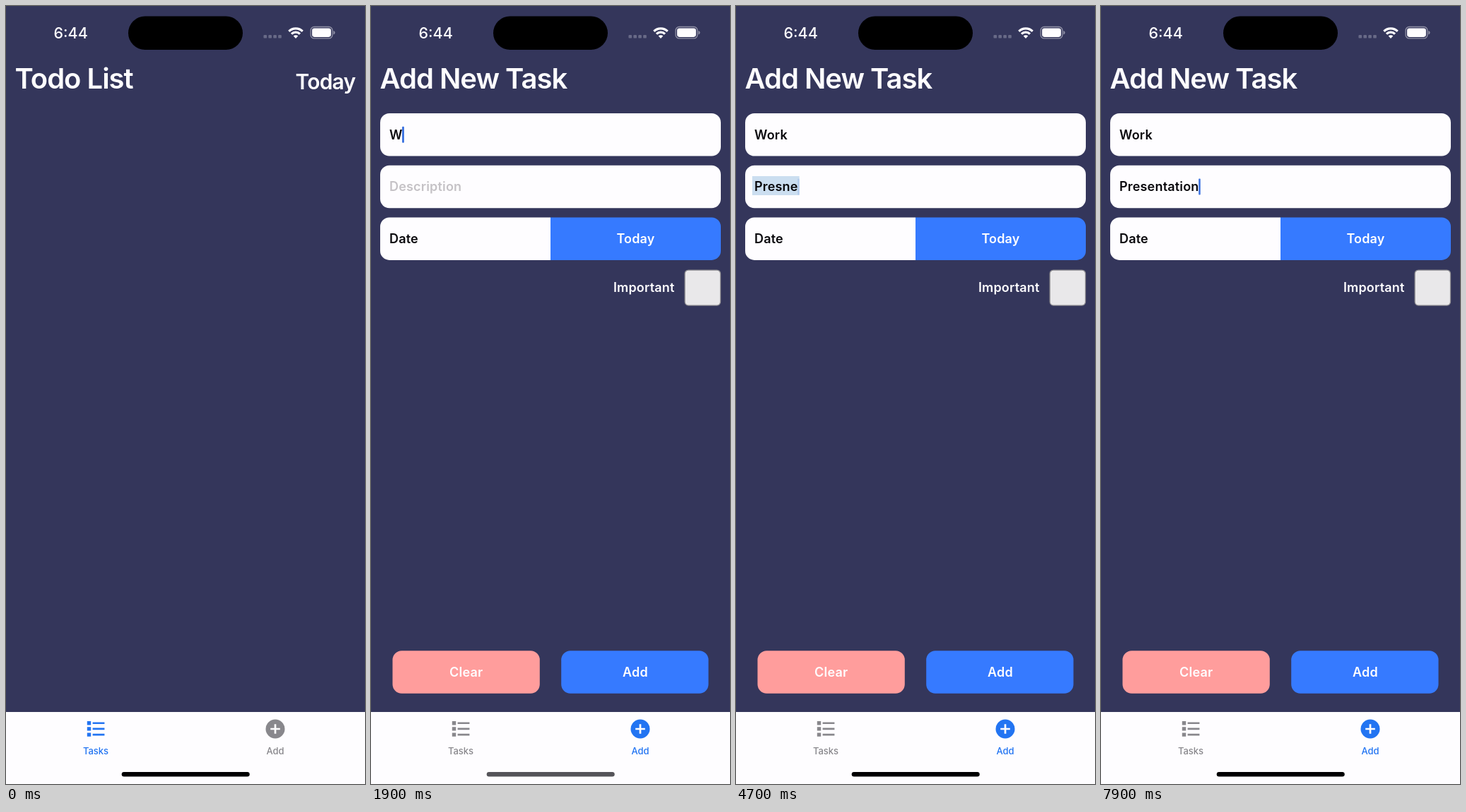
An HTML page that plays this animation: 508x1102 px, repeating every 8 s.

```html
<!DOCTYPE html>
<html lang="en">
<head>
<meta charset="utf-8">
<title>Todo List</title>
<style>
  html, body { margin: 0; width: 100%; height: 100%; overflow: hidden; background: #34365b; }
  svg { display: block; width: 508px; height: 1102px; }
  text { font-family: Inter, "Open Sans", sans-serif; font-optical-sizing: none; white-space: pre; }
  .clock { font-size: 21.5px; font-weight: 500; fill: #fefdff; }
  .title { font-size: 40px; font-weight: 600; letter-spacing: -.025em; fill: #fefdff; }
  .day { font-size: 30px; font-weight: 600; letter-spacing: -.025em; fill: #fefdff; }
  .body { font-size: 18px; font-weight: 600; letter-spacing: .01em; fill: #09080c; }
  .light { fill: #fefdff; }
  .hint { fill: #c5c2c6; }
  .guess { fill: #929195; }
  .mid { text-anchor: middle; }
  .tab { font-size: 13px; font-weight: 500; text-anchor: middle; }
  .white { fill: #fefdff; }
  .blue { fill: #367aff; }
  .off { fill: #88878c; }
  .on { fill: #2274f2; }
</style>
</head>
<body>
<svg viewBox="0 0 508 1102">
  <rect width="508" height="1102" fill="#34365b"/>

  <text class="clock" x="67.5" y="46">6:44</text>
  <rect x="173" y="14.5" width="162" height="47.5" rx="23.75"/>
  <g fill="#686a87">
    <rect x="364.5" y="41" width="4.6" height="4.6" rx="1.2"/>
    <rect x="371.4" y="41" width="4.6" height="4.6" rx="1.2"/>
    <rect x="378.3" y="41" width="4.6" height="4.6" rx="1.2"/>
    <rect x="385.2" y="41" width="4.6" height="4.6" rx="1.2"/>
  </g>
  <g fill="none" stroke="#fefdff" stroke-width="3.2">
    <path d="M400.3 35.8a13.8 13.8 0 0 1 19.4 0"/>
    <path d="M404 39.7a8.5 8.5 0 0 1 12 0"/>
  </g>
  <path class="white" d="M410 46l-3.3-3.4a4.7 4.7 0 0 1 6.6 0z"/>
  <rect x="431.1" y="29.5" width="30.8" height="16.4" rx="5" fill="none" stroke="#9091a6" stroke-width="1.3"/>
  <rect class="white" x="433.1" y="31.5" width="26.8" height="12.4" rx="3.3"/>
  <path d="M463.4 35v5.6q2.2-.7 2.2-2.8t-2.2-2.8z" fill="#9091a6"/>

  <g id="list">
    <text class="title" x="12.5" y="116.5">Todo List</text>
    <text class="day" x="494.5" y="118" text-anchor="end">Today</text>
  </g>

  <g id="form">
    <text class="title" x="12.5" y="116.5">Add New Task</text>
    <g class="white">
      <rect x="13" y="152" width="482" height="60.5" rx="13"/>
      <rect x="13" y="225.7" width="482" height="60.5" rx="13"/>
      <path d="M254 299.4H26a13 13 0 0 0-13 13v34.5a13 13 0 0 0 13 13h228z"/>
    </g>
    <path class="blue" d="M254 299.4h228a13 13 0 0 1 13 13v34.5a13 13 0 0 1-13 13H254z"/>
    <rect id="mark" x="23" y="241" height="27" fill="#cbdef0"/>
    <text class="body" x="26" y="188.6"><tspan id="name"></tspan></text>
    <text class="body" x="26" y="262.3"><tspan id="note"></tspan><tspan id="rest" class="guess"></tspan></text>
    <rect id="caret" width="2.6" height="23" rx="1" fill="#2b66de"/>
    <text class="body" x="26" y="336">Date</text>
    <text class="body light mid" x="374.5" y="336">Today</text>
    <text class="body light" x="429.5" y="405" text-anchor="end">Important</text>
    <rect x="444.1" y="374.1" width="50.4" height="50" rx="5" fill="#e9e8ea" stroke="#8c8b8f" stroke-width="1.3"/>
    <rect x="30.5" y="913.2" width="208.3" height="60.6" rx="13" fill="#ff9d9c"/>
    <text class="body light mid" x="134.7" y="950">Clear</text>
    <rect id="submit" x="269.2" y="913.2" width="208.3" height="60.6" rx="13"/>
    <text class="body light mid" x="373.9" y="950">Add</text>
  </g>

  <rect class="white" y="1000" width="508" height="102"/>
  <g id="tasksTab">
    <path d="M114.8 1013h5.4v5.4h-5.4zm0 8.2h5.4v5.4h-5.4zm0 8.2h5.4v5.4h-5.4zM122.6 1014.4h16.8v2.7h-16.8zm0 8.2h16.8v2.7h-16.8zm0 8.2h16.8v2.7h-16.8z"/>
    <text class="tab" x="127" y="1060">Tasks</text>
  </g>
  <g id="addTab">
    <circle cx="381" cy="1024" r="13.5"/>
    <path d="M374.2 1024h13.6M381 1017.2v13.6" stroke="#fefdff" stroke-width="2.7"/>
    <text class="tab" x="381" y="1060">Add</text>
  </g>
  <rect id="home" x="163.7" y="1085" width="181" height="6.5" rx="3.25"/>
</svg>

<script>
  const LOOP = 8000;
  const OPEN = 500, FOCUS = 1500, NEXT_FIELD = 3300, WAKE = 4300;
  const $ = id => document.getElementById(id);

  // Each track lists [start time, value].
  const nameTrack = [[0, ''], [1900, 'W'], [2100, 'Wor'], [2300, 'Work']];
  const noteTrack = [
    [0, ''], [3500, 'P'], [3700, 'Pre'], [3900, 'Pres'], [4100, 'Presn'], [4300, 'Presne'],
    [4900, 'Presn'], [5100, 'Pres'], [5300, 'Prese'], [5500, 'Presen'],
    [6300, 'Present'], [6500, 'Presenta'], [6700, 'Presentati'], [6900, 'Presentation']
  ];
  const caretTrack = [
    [0, 0], [1300, 1], [2900, 0], [3300, 1], [4700, .15], [4900, 1],
    [7500, .5], [7700, 0], [7900, .9]
  ];
  const word = 'Presentation';

  const at = (track, t) => track.filter(([start]) => start <= t).pop()[1];
  const show = (el, on) => el.setAttribute('visibility', on ? 'visible' : 'hidden');

  function fill(id, text, hint) {
    const el = $(id);
    const value = text || hint;
    if (el.textContent !== value) el.textContent = value;
    el.setAttribute('class', text ? '' : 'hint');
    return text ? el.getComputedTextLength() : 0;
  }

  function draw(t) {
    const form = t >= OPEN;
    show($('list'), !form);
    show($('form'), form);
    $('tasksTab').setAttribute('class', form ? 'off' : 'on');
    $('addTab').setAttribute('class', form ? 'on' : 'off');
    $('home').setAttribute('fill', t >= FOCUS && t < WAKE ? '#555459' : '#000');

    const name = at(nameTrack, t), note = at(noteTrack, t);
    const nameWidth = fill('name', name, 'Title');
    const noteWidth = fill('note', note, 'Description');
    const guess = t >= 5900 && t < 6900 ? word.slice(note.length) : '';
    if ($('rest').textContent !== guess) $('rest').textContent = guess;
    $('submit').setAttribute('fill', name ? '#367aff' : '#cac8cb');

    const second = t >= NEXT_FIELD;
    $('caret').setAttribute('x', 25.6 + (second ? noteWidth : nameWidth));
    $('caret').setAttribute('y', second ? 244.5 : 170.8);
    $('caret').setAttribute('opacity', at(caretTrack, t));

    const marked = t >= 4700 && t < 6300;
    $('mark').setAttribute('width', marked ? noteWidth + 5 : 0);
  }

  const began = performance.now();
  function tick() {
    draw((performance.now() - began) % LOOP);
    requestAnimationFrame(tick);
  }
  draw(0);
  requestAnimationFrame(tick);
</script>
</body>
</html>
```
